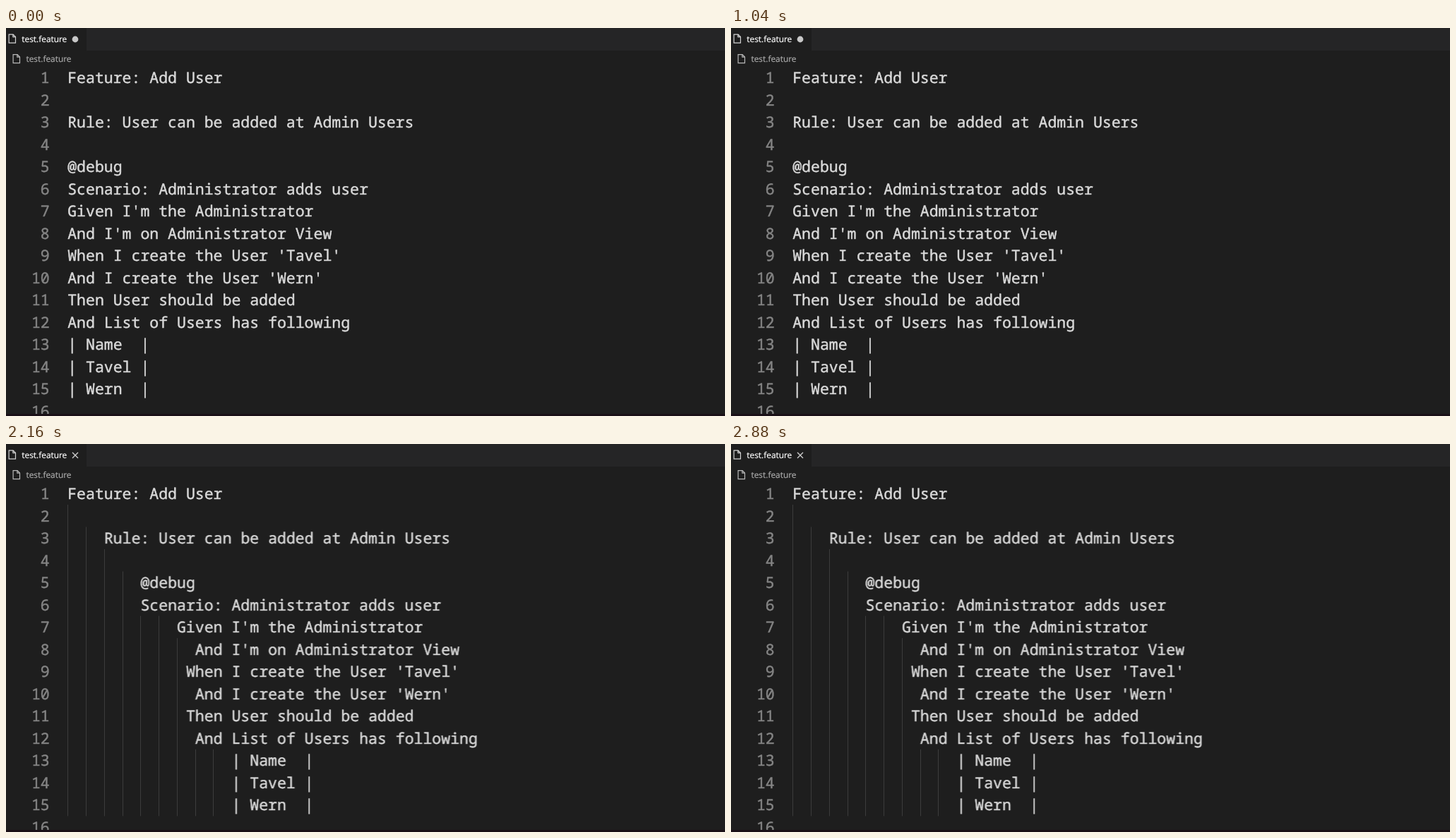
Write an HTML page that moves like this. It is 1018 px wide and 550 px high and loops after 3.2 s.

```html
<!DOCTYPE html>
<html lang="en">
<head>
<meta charset="utf-8">
<title>Feature file formatting</title>
<style>
  html, body { margin: 0; width: 100%; height: 100%; overflow: hidden; background: #1e1e1e; }
  svg { display: block; width: 100%; height: 100%; }
  text { text-rendering: geometricPrecision; white-space: pre; }
  .code, .num { font: 21.5px "Noto Sans Mono", "DejaVu Sans Mono", monospace; font-variant-ligatures: none; stroke-width: .45; }
  .code { fill: #dadada; stroke: #dadada; }
  .num { fill: #858585; stroke: #858585; text-anchor: end; }
  .label { font: 11.9px "Open Sans", "Noto Sans", sans-serif; stroke-width: .2; }
  .icon { fill: none; stroke-width: 1.2; }

  .code, .guides, .dot, .cross { animation: 3200ms step-end infinite; }
  .code { animation-name: indent; }
  .guides { animation-name: guides; }
  .dot { animation-name: unsaved; }
  .cross { animation-name: saved; }
  @keyframes indent { from { transform: none; } 50%, to { transform: translateX(var(--dx)); } }
  @keyframes guides { from { opacity: 0; } 50%, to { opacity: 1; } }
  @keyframes unsaved { from { opacity: 1; } 56.25%, to { opacity: 0; } }
  @keyframes saved { from { opacity: 0; } 56.25%, to { opacity: 1; } }
</style>
</head>
<body>
<svg viewBox="0 0 1018 550" preserveAspectRatio="none">
  <defs>
    <path id="file" d="M.6 .6H6.6L10 4V12.6H.6ZM6.4 .8V4.2H9.8"/>
  </defs>
  <rect width="1018" height="550" fill="#1e1e1e"/>
  <rect x="114" width="904" height="32" fill="#252526"/>

  <use href="#file" class="icon" x="3.5" y="8.5" stroke="#d4d4d4"/>
  <text class="label" x="22.3" y="20.4" fill="#fff" stroke="#fff">test.feature</text>
  <circle class="dot" cx="98" cy="16" r="4.4" fill="#c8c8c8"/>
  <path class="cross" d="M94 12l8 8m0-8l-8 8" stroke="#d0d0d0" stroke-width="1.3"/>

  <use href="#file" class="icon" x="9.5" y="37" stroke="#b8b8b8"/>
  <text class="label" x="28.5" y="48.3" fill="#aaa" stroke="#aaa">test.feature</text>

  <g id="guides" class="guides" stroke="#3c3c3c"></g>
  <g id="editor"></g>
  <rect y="547" width="1018" height="3" fill="#1a1017"/>
</svg>
<script>
  const LEFT = 87.2, PITCH = 12.9, ROW = 31.53, TOP = 54.5, BASE = 23.5;

  // [columns of indent after formatting, text]
  const lines = [
    [0, "Feature: Add User"],
    [0, ""],
    [4, "Rule: User can be added at Admin Users"],
    [0, ""],
    [8, "@debug"],
    [8, "Scenario: Administrator adds user"],
    [12, "Given I'm the Administrator"],
    [14, "And I'm on Administrator View"],
    [13, "When I create the User 'Tavel'"],
    [14, "And I create the User 'Wern'"],
    [13, "Then User should be added"],
    [14, "And List of Users has following"],
    [18, "| Name  |"],
    [18, "| Tavel |"],
    [18, "| Wern  |"],
    [0, ""]
  ];

  // First line covered by each guide, one guide every two columns
  const guideStarts = [2, 3, 4, 5, 7, 7, 8, 13, 13];
  const GUIDE_LEFT = 87.8, GUIDE_GAP = 25.75;

  const lineTop = n => TOP + (n - 1) * ROW;

  function add(parent, tag, attrs, text = "") {
    const el = document.createElementNS("http://www.w3.org/2000/svg", tag);
    for (const key in attrs) el.setAttribute(key, attrs[key]);
    el.textContent = text;
    parent.append(el);
  }

  const editor = document.getElementById("editor");
  lines.forEach(([indent, text], i) => {
    const y = lineTop(i + 1) + BASE;
    add(editor, "text", { class: "num", x: 61.7, y }, i + 1);
    if (text) add(editor, "text", { class: "code", x: LEFT, y, style: `--dx:${indent * PITCH}px` }, text);
  });

  const guides = document.getElementById("guides");
  guideStarts.forEach((start, i) => {
    const x = Math.floor(GUIDE_LEFT + i * GUIDE_GAP) + 0.5;
    add(guides, "line", { x1: x, x2: x, y1: lineTop(start), y2: lineTop(16) });
  });
</script>
</body>
</html>
```
